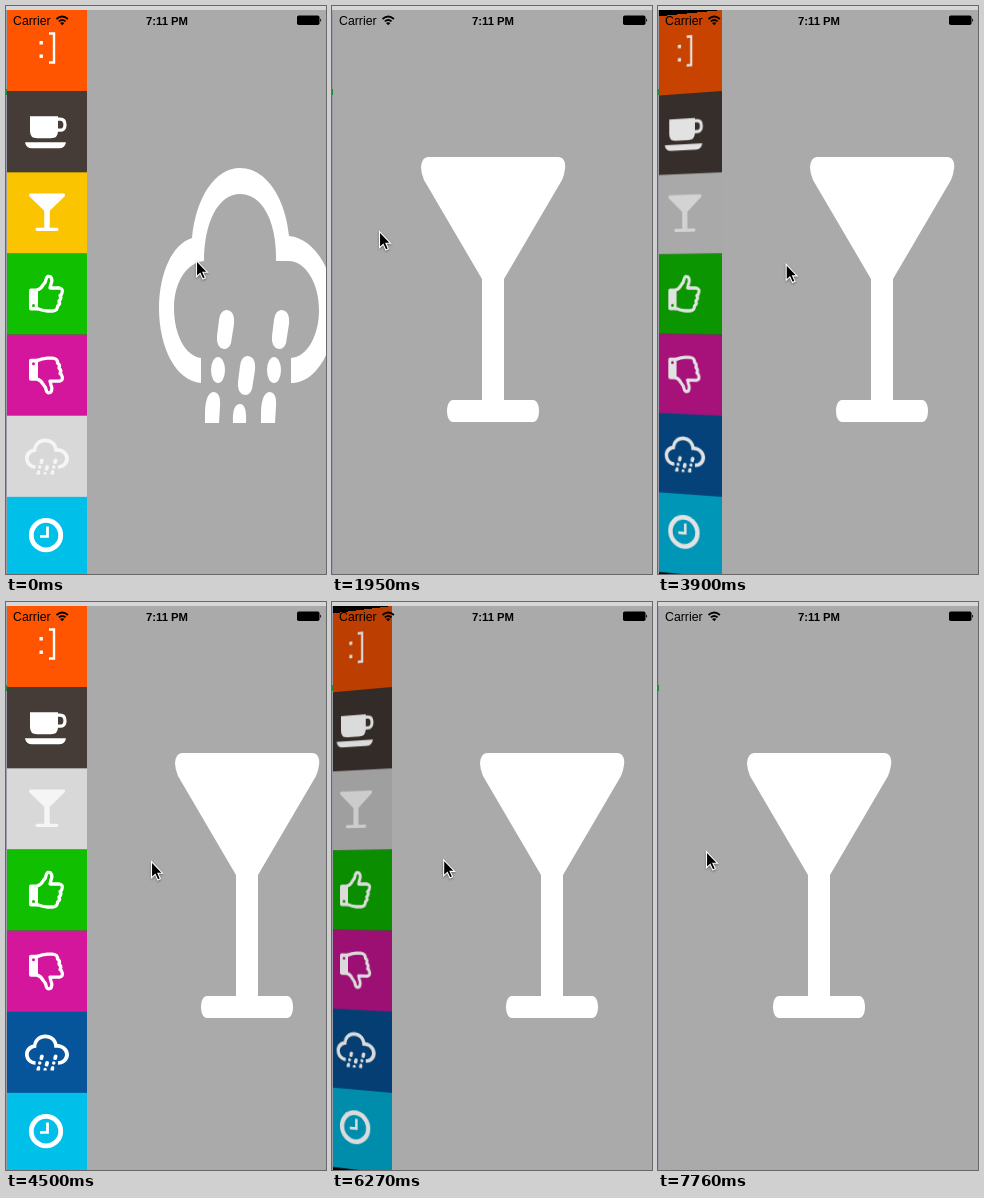
Recreate the animation shown at these times as an HTML page. Size 320 by 568 pixels, loop 8 s.

```html
<!DOCTYPE html>
<html lang="en">
<head>
<meta charset="utf-8">
<title>Folding side menu</title>
<style>
  html, body { margin: 0; width: 100%; height: 100%; overflow: hidden; background: #9c9ca6; }
  #stage { position: relative; width: 320px; height: 568px; overflow: hidden; }
  #stage > *, #app > * { position: absolute; }
  #strip { width: 320px; height: 4px; background: #d6d6d6; }
  #speck { top: 83px; width: 1px; height: 6px; background: #1f8a3c; }
  #app { left: 1px; top: 4px; width: 319px; height: 564px; overflow: hidden; background: #000; }
  #menu { width: 80px; height: 568px; transform-origin: 100% 50%; }
  #detail { width: 320px; height: 568px; background: #aaa; }
  svg { display: block; overflow: visible; }
  #icons .line, #defs .line { fill: none; stroke: currentColor; }
  .selected { opacity: .75; }
  text { font: 12.3px "Liberation Sans", Arial, sans-serif; }
  .clock { font-size: 11.3px; font-weight: bold; text-anchor: middle; }
</style>
</head>
<body>
<div id="stage">
  <div id="strip"></div>
  <div id="speck"></div>
  <div id="app">
    <svg id="menu" width="80" height="568"><g id="rows"></g><g id="icons" fill="currentColor"></g></svg>
    <svg id="detail" color="#fff" fill="#fff"><use id="big" transform="scale(4 7.1)"/></svg>
  </div>

  <svg width="320" height="568">
    <defs id="defs">
      <g id="face">
        <path d="M32.5 30.5h3.4v3.4h-3.4zM32.5 44h3.4v3.4h-3.4z"/>
        <path class="line" stroke-width="2.4" d="M42 23h5v29h-5"/>
      </g>
      <g id="cup">
        <path d="M23 24.5h28v15q0 7-7 7H30q-7 0-7-7zM18 50.5h41q-1 6-7 6H25q-6 0-7-6z"/>
        <path class="line" stroke-width="3.2" d="M50 27.5h3q5 0 5 5.5t-5 5.5h-3"/>
      </g>
      <g id="glass" transform="scale(.25 .14085)">
        <path d="M95 147H225C231 147 233 153 232 159Q231 166 229 170L171 269V390H200C208 390 208 412 200 412H120C112 412 112 390 120 390H149V269L91 170Q88 163 88 157Q89 147 95 147Z"/>
      </g>
      <g id="up">
        <path fill-rule="evenodd" d="M22 36.5q0-2 2-2h7v22h-7q-2 0-2-2zM25 51.5a1.5 1.5 0 1 0 3 0a1.5 1.5 0 1 0-3 0z"/>
        <path class="line" stroke-width="3.3" stroke-linejoin="round" d="M30 36q4-1 6-5q3-3 3.500-7q1-2.500 4-1.200q2.500 2.700.5 7.200l-1 4h9.500q4 1 2.500 5q-.5 2-2 2.500q2 3-1 5.500q1.500 3.500-1.500 5q.5 4.500-5 5h-5q-5-.3-10.500-2.500"/>
      </g>
      <g id="down"><use href="#up" transform="matrix(1 0 0 -1 0 80)"/></g>
      <g id="cloud" transform="scale(.25 .14085) translate(-81 -4)">
        <path d="M195 377C170 375 153 342 153 302C153 268 166 238 186 232C190 190 210 162 234 162C259 162 279 190 283 230C308 232 329 265 329 304C329 345 310 377 285 377V352C301 351 313 330 313 304C313 275 298 255 283 255H270C271 215 256 188 234 188C213 188 198 215 198 255C182 256 168 275 168 302C168 330 180 350 195 352Z"/>
        <path id="drop" d="M220 304q9 0 8 14l-3 19q-2 6-7 6q-8-1-7-13l2-16q1-9 7-10z"/>
        <use href="#drop" x="55"/><use href="#drop" x="21" y="46"/>
        <ellipse cx="212" cy="364" rx="7" ry="13"/><ellipse cx="268" cy="364" rx="7" ry="13"/>
        <path id="cut" d="M199 417V405Q200 386 208 386Q215 387 214 400L213 417Z"/>
        <use href="#cut" x="56"/>
        <path d="M227 417Q226 398 234 398Q241 398 240 417Z"/>
      </g>
      <g id="watch">
        <circle class="line" cx="39" cy="37.700" r="14.700" stroke-width="4.800"/>
        <path class="line" stroke-width="2.800" d="M40.500 29v10H33"/>
      </g>
    </defs>

    <text x="7" y="18.500">Carrier</text>
    <g fill="none" stroke="#000" stroke-width="1.800">
      <path d="M50.500 13q5.700-5 11.400 0M52.800 15.400q3.400-2.900 6.800 0"/>
      <path fill="#000" stroke="none" d="M54 17q2.200-1.700 4.400 0l-2.200 2.300z"/>
    </g>
    <text class="clock" x="161" y="18.500">7:11 PM</text>
    <rect x="291" y="9.500" width="22.500" height="9.500" rx="1.800"/>
    <path d="M314.200 12.500q2 1.700 0 3.500z"/>
    <path id="cursor" d="M0 0V16L3.700 12.600L6.300 18.200L8.900 17L6.400 11.500H11Z"
          stroke="#fff" stroke-width="1.100" style="filter:drop-shadow(0 1px 1px #0006)"/>
  </svg>
</div>

<script>
const $ = id => document.getElementById(id);
const LOOP = 8000, MENU = 80, ROW = 568 / 7;
const items = [
  ['face', '#ff5500'], ['cup', '#453b37'], ['glass', '#fac500'], ['up', '#0fbf00'],
  ['down', '#d4169c'], ['cloud', '#06559b'], ['watch', '#00c0ea']
];

// time, cursor x, cursor y, visible menu width
const keys = [
  [0, 190, 254, 80], [750, 28, 198, 80], [900, 28, 198, 80], [1050, 28, 198, 76],
  [1200, 28, 198, 48], [1350, 28, 198, 10], [1500, 28, 198, 0], [1650, 28, 198, 0],
  [1950, 47, 225, 0], [2250, 48, 249, 0], [2550, 48, 249, 0], [3000, 64, 252, 2],
  [3150, 73, 253, 8], [3450, 105, 255, 40], [3600, 119, 257, 54], [4500, 145, 259, 80],
  [5250, 145, 259, 80], [5690, 132, 258, 80], [5830, 128, 258, 76], [6870, 89, 256, 36.5],
  [7320, 55, 251, 5], [7620, 48, 249, 1], [7760, 48, 249, 0], [LOOP, 48, 249, 0]
];

$('rows').innerHTML = items.map((_, i) =>
  `<rect y="${i * ROW}" width="${MENU}" height="${ROW + .3}"/>`).join('');
$('icons').innerHTML = items.map(([name], i) =>
  `<use href="#${name}" y="${i * ROW + .57}"/>`).join('');

function select(name) {
  $('big').setAttribute('href', '#' + name);
  items.forEach(([item, color], i) => {
    const on = item === name;
    $('rows').children[i].setAttribute('fill', on ? '#d8d8d8' : color);
    $('icons').children[i].classList.toggle('selected', on);
  });
}

// The picture advances in steps of about 150 ms
function hold(t) {
  if (t < 5387) return Math.floor((t + 3) / 150) * 150;
  const step = 2370 / 16;
  return 5390 + Math.floor((t - 5376) / step) * step;
}

function sample(t) {
  const i = Math.max(1, keys.findIndex(k => k[0] >= t));
  const a = keys[i - 1], b = keys[i], p = (t - a[0]) / (b[0] - a[0]);
  return a.map((v, n) => v + (b[n] - v) * p);
}

let selected;
function draw(time) {
  const [t, x, y, width] = sample(hold(time));
  const open = width / MENU;
  const name = t < 1050 ? 'cloud' : 'glass';
  if (name !== selected) select(selected = name);

  $('menu').style.left = width - MENU + 'px';
  $('menu').style.transform = open < 1 ? `perspective(1000px) rotateY(${(open - 1) * 90}deg)` : 'none';
  $('rows').style.opacity = open;
  const level = 255 * Math.sqrt(open);
  $('icons').style.color = `rgb(${level}, ${level}, ${level})`;
  $('detail').style.left = width + 'px';
  $('cursor').setAttribute('transform', `translate(${x + .5} ${y + .7})`);
}

const start = performance.now();
function frame() {
  draw((performance.now() - start) % LOOP);
  requestAnimationFrame(frame);
}
frame();
</script>
</body>
</html>
```
